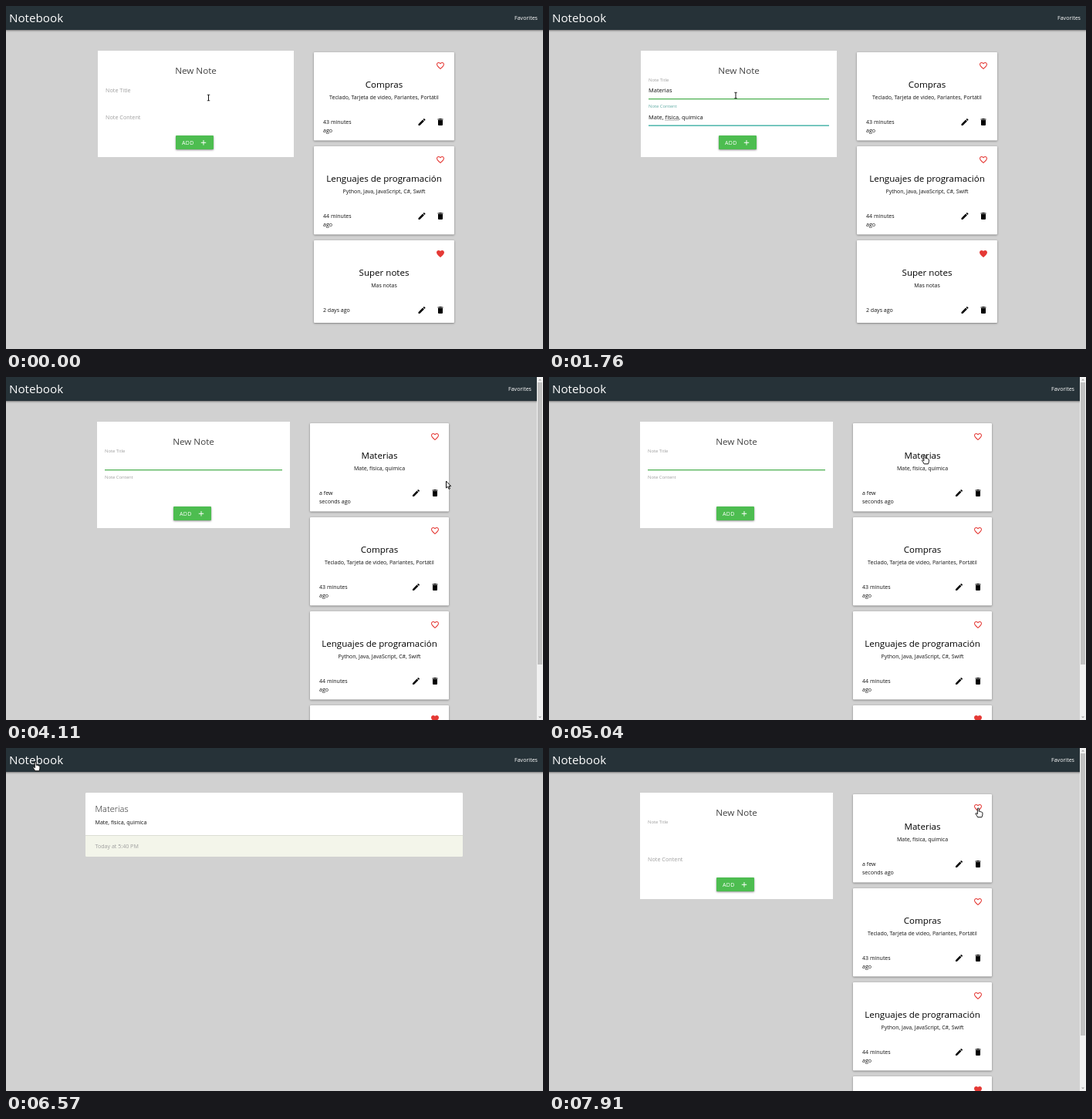
An HTML page with a canvas for the animation above (8000 ms loop, 696 px wide and 445 px high).

```html
<!DOCTYPE html>
<html lang="es">
<head>
<meta charset="utf-8">
<title>Notebook</title>
<style>
  html, body { margin: 0; width: 100%; height: 100%; overflow: hidden; background: #d1d1d1; }
  canvas { display: block; width: 696px; height: 445px; }
</style>
</head>
<body>
<canvas id="stage"></canvas>
<script>
const W = 696, H = 445, LOOP = 8000;
const canvas = document.getElementById('stage');
const ctx = canvas.getContext('2d');
const ratio = window.devicePixelRatio || 1;
canvas.width = W * ratio;
canvas.height = H * ratio;

const FONT = '"Open Sans", "Noto Sans", sans-serif';
const TEAL = '#26a69a', GREEN = '#4caf50', GREY = '#9e9e9e', RED = '#e53935';

// Moments of the interaction, in ms
const FOCUS = 110, TAB = 800, TYPED = 1740, ADDED = 3200, OPENED = 5150, BACK = 6900;
const CLICKS = [FOCUS, 3080, 5100, 6720];

const TITLE = 'Materias', BODY = 'Mate, física, quimica';
const saved = [
  { title: 'Compras', body: 'Teclado, Tarjeta de video, Parlantes, Portátil', age: ['43 minutes', 'ago'] },
  { title: 'Lenguajes de programación', body: 'Python, Java, JavaScript, C#, Swift', age: ['44 minutes', 'ago'] },
  { title: 'Super notes', body: 'Mas notas', age: ['2 days ago'], liked: true }
];
const added = { title: TITLE, body: BODY, age: ['a few', 'seconds ago'] };

// Pointer stops: time, x, y, shape used from that time on
const path = [
  [0, 262.5, 119, 'beam'], [200, 262.5, 119, 'beam'], [600, 242, 116, 'beam'],
  [2050, 242, 116, 'beam'], [2500, 241, 160, 'arrow'], [2600, 241, 168, 'hand'],
  [2850, 241, 180, 'hand'], [3300, 241, 180, 'hand'], [3420, 270, 176, 'arrow'],
  [4000, 570.5, 135, 'arrow'], [4250, 570.5, 135, 'arrow'], [4750, 495, 104, 'hand'],
  [4900, 487, 101, 'hand'], [OPENED, 487, 101, 'arrow'], [5600, 487, 101, 'arrow'],
  [6300, 60, 26, 'hand'], [6480, 38.5, 18, 'hand'], [7050, 38.5, 18, 'hand'],
  [7100, 45, 20, 'arrow'], [7720, 552, 80, 'hand'], [7850, 556.5, 78, 'hand'],
  [LOOP, 556.5, 78, 'hand']
];

const heart = new Path2D('M12 21.35l-1.45-1.32C5.4 15.36 2 12.28 2 8.5 2 5.42 4.42 3 7.5 3c1.74 0 3.41.81 4.5 2.09C13.09 3.81 14.76 3 16.5 3 19.58 3 22 5.42 22 8.5c0 3.78-3.4 6.86-8.55 11.54L12 21.35z');
const pencil = new Path2D('M3 17.25V21h3.75L17.81 9.94l-3.75-3.75L3 17.25zM20.71 7.04a1 1 0 0 0 0-1.41l-2.34-2.34a1 1 0 0 0-1.41 0l-1.83 1.83 3.75 3.75 1.83-1.83z');
const bin = new Path2D('M6 19a2 2 0 0 0 2 2h8a2 2 0 0 0 2-2V7H6v12zM19 4h-3.5l-1-1h-5l-1 1H5v2h14V4z');
const plus = new Path2D('M19 13h-6v6h-2v-6H5v-2h6V5h2v6h6v2z');
const arrow = new Path2D('M0 0V9L2.1 7.1 3.5 10.4 4.9 9.8 3.5 6.6H6.2Z');
const hand = new Path2D('M-1.2 .9Q-1.2 0 -.2 0 .8 0 .8 .9V4.3Q2.2 3.8 2.6 4.7 4 4.4 4.2 5.3 5.4 5.2 5.4 6.4V8.6Q5.2 10 4.4 11.8H-.8Q-2 9.6 -3.5 7.5 -3.6 6.4 -2.4 6.6L-1.2 7.8Z');

const clamp = v => Math.max(0, Math.min(1, v));
const ease = v => v * v * (3 - 2 * v);
const lerp = (a, b, k) => a + (b - a) * k;

function text(str, x, y, size, color, align = 'left', weight = 400) {
  ctx.font = `${weight} ${size}px ${FONT}`;
  ctx.textAlign = align;
  ctx.fillStyle = color;
  ctx.fillText(str, x, y);
}

function box(x, y, w, h, color, radius = 0) {
  ctx.fillStyle = color;
  ctx.beginPath();
  ctx.roundRect(x, y, w, h, radius);
  ctx.fill();
}

function shadowBox(x, y, w, h, color, drop = 1) {
  ctx.save();
  ctx.shadowColor = 'rgba(0,0,0,.45)';
  ctx.shadowBlur = 2.5 * ratio;
  ctx.shadowOffsetY = drop * ratio;
  box(x, y, w, h, color, 1);
  ctx.restore();
}

function icon(shape, cx, cy, color, scale = 0.5, outline = false) {
  ctx.save();
  ctx.translate(cx, cy);
  ctx.scale(scale, scale);
  ctx.translate(-12, -12);
  if (outline) {
    ctx.clip(shape);
    ctx.strokeStyle = color;
    ctx.lineWidth = 4;
    ctx.stroke(shape);
  } else {
    ctx.fillStyle = color;
    ctx.fill(shape);
  }
  ctx.restore();
}

function header(width) {
  shadowBox(-4, -4, width + 8, 35, '#263238');
  text('Notebook', 4, 21, 15.2, '#fff');
  text('Favorites', width - 7, 17.8, 7.1, '#fff', 'right');
}

function scrollbar() {
  box(688, 0, 8, H, '#f1f1f1');
  box(689, 7, 6, 366, '#c1c1c1');
  ctx.fillStyle = '#a3a3a3';
  for (const [y, d] of [[4.5, -2], [440.5, 2]]) {
    ctx.beginPath();
    ctx.moveTo(690, y);
    ctx.lineTo(694, y);
    ctx.lineTo(692, y + d);
    ctx.fill();
  }
}

function card(note, x, y, w, narrow) {
  const cx = x + w / 2;
  shadowBox(x, y, w, note.age.length > 1 ? 114.5 : 107, '#fff', 0.8);
  const iconX = x + w - 18;
  icon(heart, iconX, y + 17.5, RED, 0.5, !note.liked);
  text(note.title, cx, y + 46, 11.57, '#000', 'center');
  text(note.body, cx, y + 61.3, 7.03, '#111', 'center');
  note.age.forEach((line, i) => text(line, x + 12, y + 93 + i * 11, 7.05, '#111'));
  icon(pencil, iconX - (narrow ? 24.5 : 24), y + 90.5, '#000');
  icon(bin, iconX, y + 90.5, '#000');
}

function label(str, x, y, lift, color) {
  text(str, x, y - 14.5 * lift, lerp(7.25, 5.85, lift), color);
}

function squiggle(x, y, before, word) {
  ctx.font = `400 7.5px ${FONT}`;
  const start = x + ctx.measureText(before).width;
  ctx.strokeStyle = '#555';
  ctx.lineWidth = 0.8;
  ctx.setLineDash([1, 1]);
  ctx.beginPath();
  ctx.moveTo(start, y);
  ctx.lineTo(start + ctx.measureText(word).width, y);
  ctx.stroke();
  ctx.setLineDash([]);
}

function typed(str, t, start, end) {
  return str.slice(0, Math.floor(str.length * clamp((t - start) / (end - start))));
}

function formState(t) {
  if (t >= BACK) return { lift1: 1, lift2: 0 };
  if (t >= ADDED) return { lift1: 1, lift2: 1, line1: GREEN };
  const inBody = t >= TAB;
  return {
    lift1: ease(clamp((t - FOCUS) / 200)),
    lift2: ease(clamp((t - TAB) / 200)),
    line1: t < FOCUS ? null : inBody ? GREEN : TEAL,
    line2: inBody ? TEAL : null,
    title: typed(TITLE, t, 260, 740),
    body: typed(BODY, t, 860, TYPED),
    focus: t < FOCUS || t > TYPED ? 0 : inBody ? 2 : 1
  };
}

function form(t, narrow) {
  const x = narrow ? 118 : 119, w = narrow ? 250 : 254;
  const cx = x + w / 2, left = x + 10, lineW = w - 20;
  const s = formState(t);
  box(x, 58, w, 138, '#fff');
  text('New Note', cx, 88, 11.66, '#424242', 'center');

  const fields = [
    ['Note Title', 112, s.lift1, s.line1, s.title],
    ['Note Content', 146.5, s.lift2, s.line2, s.body]
  ];
  fields.forEach(([name, y, lift, line, value = ''], i) => {
    const active = s.focus === i + 1 || (i === 1 && line);
    label(name, left, y, lift, active ? '#5eaaa2' : GREY);
    if (line) box(left, y + 8, lineW, 1.2, line);
    text(value, left, y, 7.5, '#111');
    if (s.focus === i + 1) box(left + ctx.measureText(value).width + 0.3, y - 7, 0.7, 9, '#222');
  });
  if (s.body && s.body.length > 12) squiggle(left, 148.3, 'Mate, ', 'física');
  if (s.body === BODY && t > 1800) squiggle(left, 148.3, 'Mate, física, ', 'quimica');

  const bx = narrow ? 217 : 220;
  const hover = !narrow && t > 2550;
  shadowBox(bx, 168, 49, 18, '#4dbd50', hover ? 1.5 : 1);
  ctx.letterSpacing = '0.25px';
  text('ADD', bx + 8, 179.8, 7.1, '#fff');
  ctx.letterSpacing = '0px';
  icon(plus, bx + 36, 177.2, '#fff', 0.46);
}

function listPage(t) {
  const narrow = t >= ADDED;
  header(narrow ? 688 : W);
  form(t, narrow);
  const notes = narrow ? [added, ...saved] : saved;
  notes.forEach((note, i) => card(note, narrow ? 394 : 399, 60 + i * 122, narrow ? 180 : 182, narrow));
  if (narrow) scrollbar();
}

function detailPage() {
  header(W);
  box(103, 58, 489, 83, '#f3f5ea', 1.5);
  box(103, 58, 489, 55, '#fff', [1.5, 1.5, 0, 0]);
  box(103, 113, 489, 0.7, '#d5d7cd');
  text(TITLE, 115.5, 83.3, 11.1, '#222', 'left', 300);
  text(BODY, 115.5, 98.7, 7.1, '#111');
  text('Today at 5:40 PM', 115.5, 130.3, 7.1, GREY);
}

function pointerAt(t) {
  const i = path.findIndex((p, n) => n + 1 === path.length - 1 || t < path[n + 1][0]);
  const a = path[i], b = path[i + 1];
  const k = ease(clamp((t - a[0]) / (b[0] - a[0])));
  return { x: lerp(a[1], b[1], k), y: lerp(a[2], b[2], k), kind: a[3] };
}

function ring(r, width, color) {
  ctx.strokeStyle = color;
  ctx.lineWidth = width;
  ctx.beginPath();
  ctx.arc(0, 0, r, 0, Math.PI * 2);
  ctx.stroke();
}

function disc(r, color) {
  ctx.fillStyle = color;
  ctx.beginPath();
  ctx.arc(0, 0, r, 0, Math.PI * 2);
  ctx.fill();
}

function cursorShape(kind) {
  if (kind === 'beam') {
    box(-0.5, -4, 1, 8, '#111');
    box(-1.8, -4.2, 3.6, 0.8, '#111');
    box(-1.8, 3.4, 3.6, 0.8, '#111');
    return;
  }
  const shape = kind === 'hand' ? hand : arrow;
  ctx.lineJoin = 'round';
  ctx.lineWidth = 1;
  ctx.strokeStyle = '#111';
  ctx.fillStyle = '#fff';
  ctx.fill(shape);
  ctx.stroke(shape);
}

function pointer(t) {
  const p = pointerAt(t);
  const click = CLICKS.find(c => t >= c && t < c + 330);
  const age = click === undefined ? 1 : (t - click) / 330;
  const alpha = clamp((1 - age) * 2.5);
  ctx.save();
  ctx.translate(p.x, p.y);
  if (age < 1) {
    ctx.globalAlpha = alpha;
    const grow = ease(clamp(age / 0.45));
    disc(12 * grow, 'rgba(255,255,255,.7)');
    ring(12.2 * grow, 0.9, '#a9c0ee');
    ring(8.2 * grow, 3.2, '#6f98e8');
    ctx.globalAlpha = 1;
  }
  cursorShape(p.kind);
  if (age < 1) {
    ctx.globalAlpha = alpha;
    disc(2.3, '#7c9fe6');
  }
  ctx.restore();
}

function draw() {
  const t = performance.now() % LOOP;
  ctx.setTransform(ratio, 0, 0, ratio, 0, 0);
  box(0, 0, W, H, '#d1d1d1');
  if (t >= OPENED && t < BACK) detailPage();
  else listPage(t);
  pointer(t);
  requestAnimationFrame(draw);
}
draw();
</script>
</body>
</html>
```
